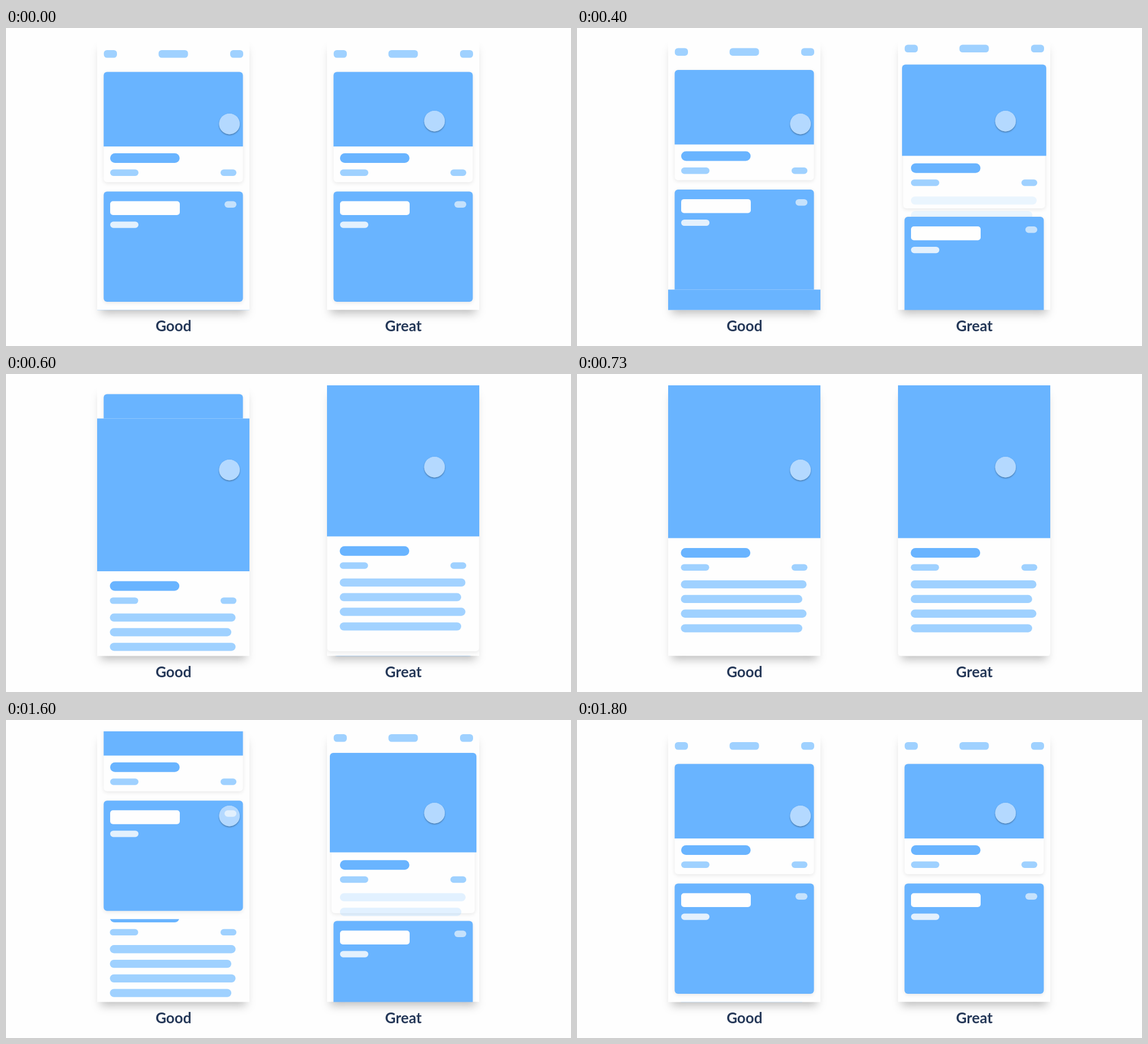
An HTML page with a canvas that plays this animation: 998 px wide and 561 px high, repeating every 2.46 s.

```html
<!DOCTYPE html>
<html lang="en">
<head>
<meta charset="utf-8">
<title>Good and great transitions</title>
<style>
  html, body { margin: 0; width: 100%; height: 100%; overflow: hidden; background: #fefefe; }
  canvas { display: block; }
</style>
</head>
<body>
<canvas id="stage" width="998" height="561"></canvas>
<script>
const ctx = document.getElementById('stage').getContext('2d');
const LOOP = 2460, FPS = 15, BACK = 1400;
const W = 269, H = 477.5, TOP = 20;
const WHITE = '#fefefe', BLUE = '#69b4ff', LIGHT = '#9fd1ff';

// Ease curve with control points (x1, 0) and (x2, 1).
function ease(t, start, end, x1, x2) {
  const x = (t - start) / (end - start);
  if (x <= 0) return 0;
  if (x >= 1) return 1;
  let lo = 0, hi = 1;
  for (let i = 0; i < 24; i++) {
    const s = (lo + hi) / 2, r = 1 - s;
    if (3 * r * r * s * x1 + 3 * r * s * s * x2 + s ** 3 < x) lo = s; else hi = s;
  }
  return lo * lo * (3 - 2 * lo);
}

function box(x, y, w, h, radius, color) {
  ctx.fillStyle = color;
  ctx.beginPath();
  ctx.roundRect(x, y, w, h, radius);
  ctx.fill();
}

const pill = (x, y, w, h, color) => box(x, y, w, h, h / 2, color);

function withShadow(dy, blur, alpha, draw) {
  ctx.save();
  ctx.shadowOffsetY = dy;
  ctx.shadowBlur = blur;
  ctx.shadowColor = `rgba(0,0,0,${alpha})`;
  draw();
  ctx.restore();
}

const raised = (x, y, w, h, color) =>
  withShadow(2, 7, 0.09, () => box(x, y, w, h, 6, color));

function at(y, draw) {
  ctx.save();
  ctx.translate(0, y);
  draw();
  ctx.restore();
}

function header(y) {
  for (const [x, w] of [[11.8, 23.2], [108.5, 52], [235, 23]]) box(x, y, w, 13.5, 5.5, LIGHT);
}

function heading(x, y) {
  pill(x, y, 122.7, 17, BLUE);
  pill(x, y + 28.6, 50, 11.4, LIGHT);
  pill(218, y + 28.6, 28, 11.4, LIGHT);
}

function paragraph(x, y, alpha) {
  ctx.globalAlpha = alpha;
  for (let i = 0; i < 4; i++) pill(x, y + i * 25.8, i % 2 ? 214.5 : 222, 14.3, LIGHT);
  ctx.globalAlpha = 1;
}

function blueCard(y) {
  raised(11.5, y, 246, 194.5, BLUE);
  box(23, y + 17, 123, 24.5, 5, WHITE);
  pill(225, y + 17, 21, 11.5, '#c6e2fc');
  pill(23, y + 53, 50, 11.2, '#e4f1fd');
}

// The list view (q = 0) whose first card grows into the detail view (q = 1).
function list(q) {
  box(0, 0, W, H, 0, WHITE);
  header(19 - 46 * q);
  const inset = 11.5 * (1 - q), top = 57.5 * (1 - q), bottom = 252 + 226 * q;
  raised(inset, top, W - 2 * inset, bottom - top, WHITE);
  const imageX = 11.5 - 21.3 * q, imageY = 57.5 - 63.8 * q;
  box(imageX, imageY, W - 2 * imageX, 189 + 80.5 * q - imageY, [6, 6, 0, 0], BLUE);
  heading(23 - 0.5 * q, 201 + 86 * q);
  paragraph(23 - 0.5 * q, 260 + 84 * q, q);
  if (q < 1) blueCard(268.5 + 217 * q);
}

function detail() {
  box(0, 0, W, H, 0, WHITE);
  box(0, 0, W, 269.5, 0, BLUE);
  heading(22.5, 287);
  paragraph(22.5, 344, 1);
}

function slidingPages(t) {
  if (t < BACK) {
    const p = ease(t, 333.3, 733.3, 0.39, 0.365);
    at(-0.1 * H * p, () => list(0));
    at(H * (1 - p), detail);
  } else {
    const p = ease(t, BACK, 1800, 0.39, 0.334);
    at(0.1 * H * p, detail);
    at(-H * (1 - p), () => list(0));
  }
}

function growingCard(t) {
  list(t < BACK ? ease(t, 200, 733.3, 0.744, 0.132)
                : 1 - ease(t, BACK, 1800, 0.355, 0.351));
}

function touchPoint(x, y) {
  const circle = new Path2D();
  circle.arc(x, y, 18.2, 0, 2 * Math.PI);
  const outside = new Path2D(circle);
  outside.rect(x - 40, y - 40, 80, 80);
  ctx.save();
  ctx.clip(outside, 'evenodd');
  ctx.fillStyle = '#b4d9ff';
  withShadow(1.5, 2.5, 0.35, () => ctx.fill(circle));
  ctx.restore();
  ctx.fillStyle = 'rgba(255,255,255,.5)';
  ctx.fill(circle);
}

function phone(left, label, content, touchX, touchY, t) {
  ctx.save();
  ctx.translate(left, TOP);
  withShadow(12, 16, 0.1, () => box(3, 3, W - 6, H - 6, 0, WHITE));
  withShadow(12, 14, 0.18, () => box(9, 9, W - 18, H - 18, 0, WHITE));
  ctx.beginPath();
  ctx.rect(0, 0, W, H);
  ctx.clip();
  content(t);
  touchPoint(touchX, touchY);
  ctx.restore();

  ctx.fillStyle = '#253858';
  ctx.font = 'bold 26px Lato, sans-serif';
  ctx.textAlign = 'center';
  ctx.fillText(label, left + W / 2 + 0.3, 535);
}

function render(now) {
  // Motion is held at 15 steps a second, on a 10 ms clock.
  const clock = Math.floor((now % LOOP) / 10) * 10;
  const t = Math.floor((clock + 7) * FPS / 1000) * 1000 / FPS;
  box(0, 0, 998, 561, 0, WHITE);
  phone(161, 'Good', slidingPages, 233.7, 149.2, t);
  phone(567, 'Great', growingCard, 189.9, 144.2, t);
}

function tick(now) {
  render(now);
  requestAnimationFrame(tick);
}
render(0);
requestAnimationFrame(tick);
</script>
</body>
</html>
```
